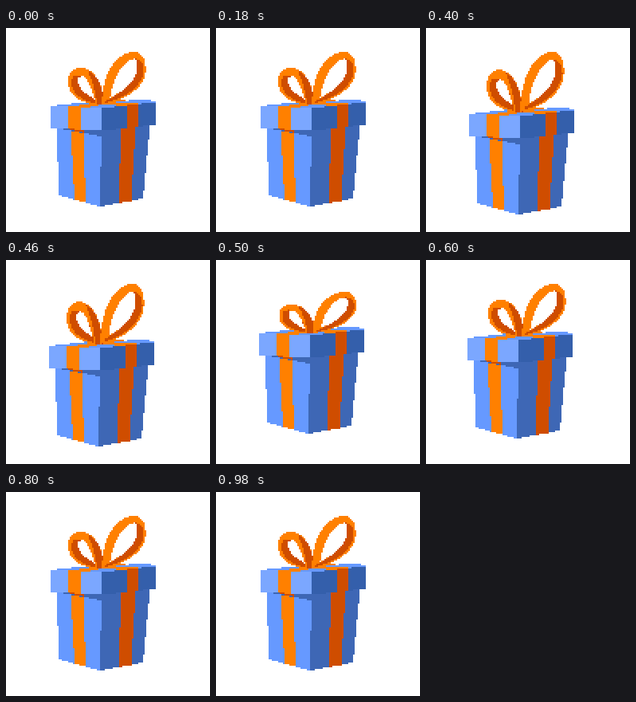
Recreate the animation shown at these times as an HTML page with a canvas. Size 256 by 256 pixels, loop 1.1 s.

```html
<!DOCTYPE html>
<html lang="en">
<head>
<meta charset="utf-8">
<title>Bouncing gift</title>
<style>
  html, body { margin: 0; width: 100%; height: 100%; overflow: hidden; background: #fff; }
  canvas { display: block; width: 100vmin; height: 100vmin; image-rendering: pixelated; }
</style>
</head>
<body>
<canvas id="stage" width="128" height="128"></canvas>
<script>
const ctx = document.getElementById('stage').getContext('2d');
const CELL = 2, GRID = 128, LOOP = 1100;
const SKY = '#7ba7ff', BLUE = '#6699ff', NAVY = '#3e67b5', DEEP = '#345fab';
const ORANGE = '#ff8000', RUST = '#cf4d00';
const BOW_BASE = 96;

const shape = (color, d) => ({ color, path: new Path2D(d) });

// Shapes run from back to front in resting coordinates.
const body = [
  shape(BLUE, 'M64 124 L120 128 L118 224 L66 210 Z'),
  shape(NAVY, 'M120 126 L181 118 L172 214 L118 224 Z'),
  shape(ORANGE, 'M81 124 L97 126 L100 219 L86 215 Z'),
  shape(RUST, 'M145 122 L163 120 L157 217 L141 220 Z'),
  shape(NAVY, 'M66 124 L120 128 V136 L66 126 Z'),
  shape(RUST, 'M81 124 H97 V131 L81 128 Z')
];
const lid = [
  shape(BLUE, 'M56 98 L100 93 L180 90 L188 93 L120 101 Z'),
  shape(ORANGE, 'M78 99 L132 91 L150 91 L94 101 Z'),
  shape(ORANGE, 'M100 94 L122 92 L166 95 L152 98 Z'),
  shape(SKY, 'M56 98 L120 101 V129 L56 125 Z'),
  shape(DEEP, 'M120 101 L188 93 V121 L120 129 Z'),
  shape(ORANGE, 'M78 98 L94 99 V128 L78 126 Z'),
  shape(RUST, 'M152 97 L166 95 V124 L152 126 Z')
];
const bow = [
  shape(ORANGE, 'M118 96 C98 95 78 89 78 66 C79 54 88 49 96 50 C112 53 122 70 123 96 Z'),
  shape(RUST, 'M114 95 C100 92 82 85 82 68 C82 60 88 57 97 61 C105 64 110 76 114 95 Z'),
  shape(ORANGE, 'M94 59 C106 60 113 76 116 96 H113 C108 78 104 64 94 59 Z'),
  shape('#fff', 'M111 89 C103 84 90 78 90 65 C91 61 94 60 97 61 C103 64 107 76 111 89 Z'),
  shape(RUST, 'M123 96 C122 72 113 57 102 53 C107 62 112 78 114 96 Z'),

  shape(ORANGE, 'M121 96 C119 70 132 32 160 30 C172 30 176 42 175 55 C173 76 150 90 121 96 Z'),
  shape(RUST, 'M124 94 C150 88 170 74 173 54 C173 44 167 38 161 39 L163 54 C158 70 148 79 126 91 Z'),
  shape('#fff', 'M131 87 C133 65 148 39 161 39 C165 40 165 46 164 54 C161 68 148 79 131 87 Z')
];

// Each pose: start time, box offset, bow offset and bow height.
const rest = { x: 0, y: 0, bowX: 0, bowY: 0, stretch: 1 };
const poses = [
  { at: 0, ...rest },
  { at: 300, x: -2, y: -8, bowX: -2, bowY: -10, stretch: 1 },
  { at: 400, x: -2, y: 10, bowX: -2, bowY: 9, stretch: 1.14 },
  { at: 500, x: -2, y: -6, bowX: 1, bowY: -4, stretch: 0.79 },
  { at: 600, x: -4, y: 0, bowX: 0, bowY: 0, stretch: 1 },
  { at: 700, ...rest, bowX: 2, stretch: 0.95 },
  { at: 800, ...rest }
];

function paint(shapes, toLocal) {
  const front = [...shapes].reverse();
  for (let row = 8; row < 120; row++) {
    for (let col = 24; col < 96; col++) {
      const [x, y] = toLocal((col + 0.5) * CELL, (row + 0.5) * CELL);
      const hit = front.find(s => ctx.isPointInPath(s.path, x, y));
      if (!hit) continue;
      ctx.fillStyle = hit.color;
      ctx.fillRect(col, row, 1, 1);
    }
  }
}

function draw(pose) {
  ctx.fillStyle = '#fff';
  ctx.fillRect(0, 0, GRID, GRID);
  paint([...body, ...lid], (x, y) => [x - pose.x, y - pose.y]);
  paint(bow, (x, y) => [
    x - pose.bowX,
    BOW_BASE + (y - pose.bowY - BOW_BASE) / pose.stretch
  ]);
}

let shown;
function tick() {
  const time = performance.now() % LOOP;
  const pose = poses.findLast(p => p.at <= time);
  if (pose !== shown) draw(shown = pose);
  requestAnimationFrame(tick);
}
tick();
</script>
</body>
</html>
```
